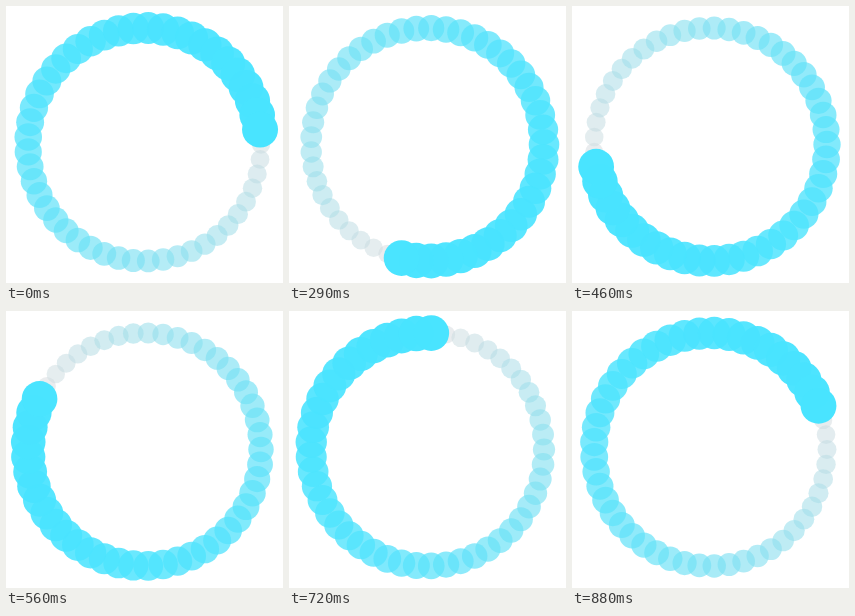
Recreate the animation shown at these times as an HTML page. Size 277 by 277 pixels, loop 920 ms.

```html
<!DOCTYPE html>
<html lang="en">
<head>
<meta charset="utf-8">
<title>Ring loader</title>
<style>
  html, body { margin: 0; width: 100%; height: 100%; overflow: hidden; background: #fff; }
  svg { display: block; width: 100%; height: 100%; }
</style>
</head>
<body>
<svg id="ring" viewBox="0 0 277 277"></svg>
<script>
const LOOP = 920, STEPS = 28, COUNT = 49;
const CENTER = 138.5, RADIUS = 116.5;
const FRESH = [73, 228, 255], FADED = [215, 218, 220];

const ring = document.getElementById('ring');
const dots = Array.from({ length: COUNT }, () => {
  const dot = document.createElementNS('http://www.w3.org/2000/svg', 'circle');
  return ring.appendChild(dot);
});

const mix = (a, b, k) => a + (b - a) * k;
const stepStart = k => 10 * Math.floor(3.28 * k + 0.42);

function stepAt(ms) {
  let k = STEPS - 1;
  while (k > 0 && stepStart(k) > ms) k--;
  return k;
}

function place(dot, slot, age) {
  const angle = slot * 2 * Math.PI / COUNT;
  const rgb = FRESH.map((c, i) => Math.round(mix(c, FADED[i], age ** 3)));
  dot.setAttribute('cx', (CENTER + RADIUS * Math.cos(angle)).toFixed(2));
  dot.setAttribute('cy', (CENTER + RADIUS * Math.sin(angle)).toFixed(2));
  dot.setAttribute('r', mix(18, 9, age).toFixed(2));
  dot.setAttribute('fill', `rgb(${rgb})`);
  dot.setAttribute('fill-opacity', mix(1, 0.5, age).toFixed(3));
}

function draw(ms) {
  const pos = stepAt(ms % LOOP) * COUNT / STEPS - 1;
  const head = Math.floor(pos);
  // Oldest dot first, so the head stays on top.
  dots.forEach((dot, n) => {
    const slot = head - (COUNT - 1 - n);
    place(dot, slot, (pos - slot) / COUNT);
  });
}

const begin = performance.now();
function tick() {
  draw(performance.now() - begin);
  requestAnimationFrame(tick);
}
tick();
</script>
</body>
</html>
```
